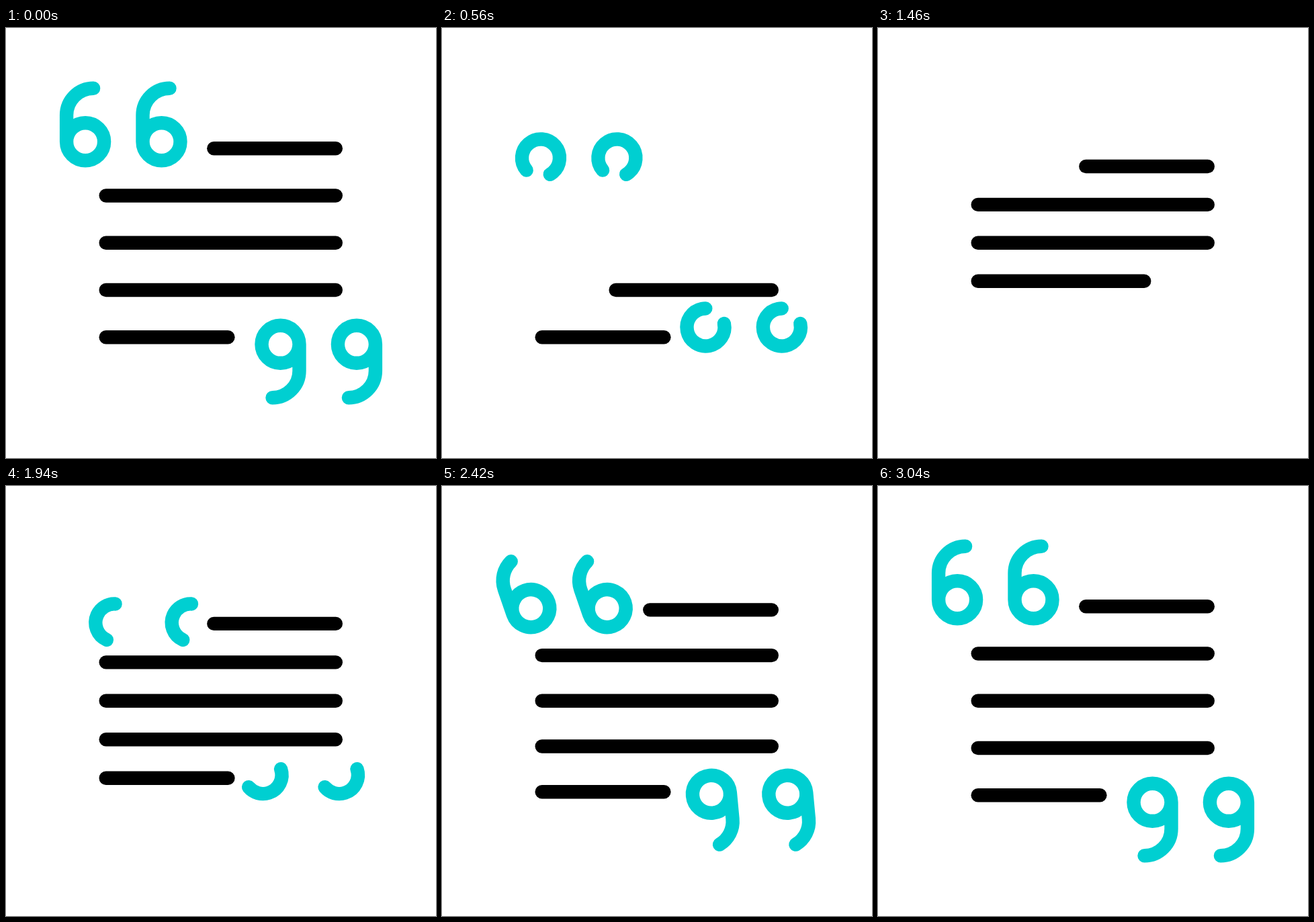
Animation of 640x640 px, one loop 3.6 s. Source, as an HTML page with a canvas:

```html
<!DOCTYPE html>
<html>
<head>
<meta charset="utf-8">
<style>
html, body { margin: 0; width: 100%; height: 100%; overflow: hidden; background: #fff; }
canvas { display: block; width: 640px; height: 640px; }
</style>
</head>
<body>
<canvas id="stage" width="640" height="640"></canvas>
<script>
const ctx = document.getElementById('stage').getContext('2d');
const LOOP = 3600, TICK = 20;
const TEAL = '#00cfd1', BLACK = '#000';
const LEFT = 148.7, RIGHT = 490.8, GAP = 70.25, TIGHT_GAP = 56.9;
const RING = 28, STEM = 39.5, HOOK = 40;
const MARK_LENGTH = 2 * Math.PI * RING + STEM + HOOK * Math.PI / 2;

const clamp = x => Math.max(0, Math.min(1, x));
const span = (t, from, length) => clamp((t - from) / length);
const smooth = u => u * u * (3 - 2 * u);

// Cubic ease with flat ends; x1 and x2 are the handle positions.
function ease(u, x1, x2) {
  let lo = 0, hi = 1;
  for (let i = 0; i < 24; i++) {
    const s = (lo + hi) / 2, r = 1 - s;
    const x = 3 * s * r * r * x1 + 3 * s * s * r * x2 + s * s * s;
    if (x < u) lo = s; else hi = s;
  }
  return smooth((lo + hi) / 2);
}

function drawLine(i, t) {
  const x0 = i === 0 ? 309.3 : LEFT;
  const x1 = i === 4 ? 330.4 : RIGHT;
  const erased = span(t, 0.1 + 8.4 * i, 8.4);
  const drawn = span(t, 32.6 + 10.85 * i, 10.85);
  let a = x0, b = x1, gap = GAP;
  if (erased < 1) {
    a = x0 + (x1 - x0) * erased;
  } else {
    if (drawn === 0) return;
    b = x0 + (x1 - x0) * drawn;
    gap = TIGHT_GAP + (GAP - TIGHT_GAP) * ease(span(t, 87, 48), 0.66, 0.51);
  }
  const y = 319.8 + (i - 2) * gap;
  ctx.beginPath();
  ctx.moveTo(a, y);
  ctx.lineTo(b, y);
  ctx.stroke();
}

// Ring first, then the stem, then the hook.
function drawMark(x, y, angle, shown) {
  ctx.save();
  ctx.translate(x, y);
  ctx.rotate(angle * Math.PI / 180);
  ctx.translate(0, 25.7);
  ctx.setLineDash(shown < 1 ? [shown * MARK_LENGTH, MARK_LENGTH * 2] : []);
  ctx.beginPath();
  ctx.arc(0, 0, RING, Math.PI, 3 * Math.PI);
  ctx.lineTo(-RING, -STEM);
  ctx.arc(HOOK - RING, -STEM, HOOK, Math.PI, 1.5 * Math.PI);
  ctx.stroke();
  ctx.restore();
}

function drawMarks(t) {
  let fold, shown;
  if (t < 60) {
    fold = smooth(span(t, 1.5, 52.5));
    shown = 1 - fold;
  } else {
    fold = 1 - ease(span(t, 81, 71), 0.333, 0.4);
    shown = ease(span(t, 81, 49), 0.333, 0.58);
  }
  if (shown < 0.0001) return;
  for (const dx of [0, 113.4]) {
    drawMark(118.1 + dx + 24 * fold, 143.5 + 60 * fold, -80 * fold, shown);
    drawMark(408.5 + dx - 21.6 * fold, 496.5 - 51 * fold, 180 - 22.5 * fold, shown);
  }
}

function render(ms) {
  const t = Math.floor((ms % LOOP) / TICK + 0.01);
  ctx.fillStyle = '#fff';
  ctx.fillRect(0, 0, 640, 640);
  ctx.lineWidth = 20.4;
  ctx.lineCap = 'round';
  ctx.lineJoin = 'round';
  ctx.strokeStyle = BLACK;
  for (let i = 0; i < 5; i++) drawLine(i, t);
  ctx.strokeStyle = TEAL;
  drawMarks(t);
}

function loop() {
  render(performance.now());
  requestAnimationFrame(loop);
}
loop();
</script>
</body>
</html>
```
